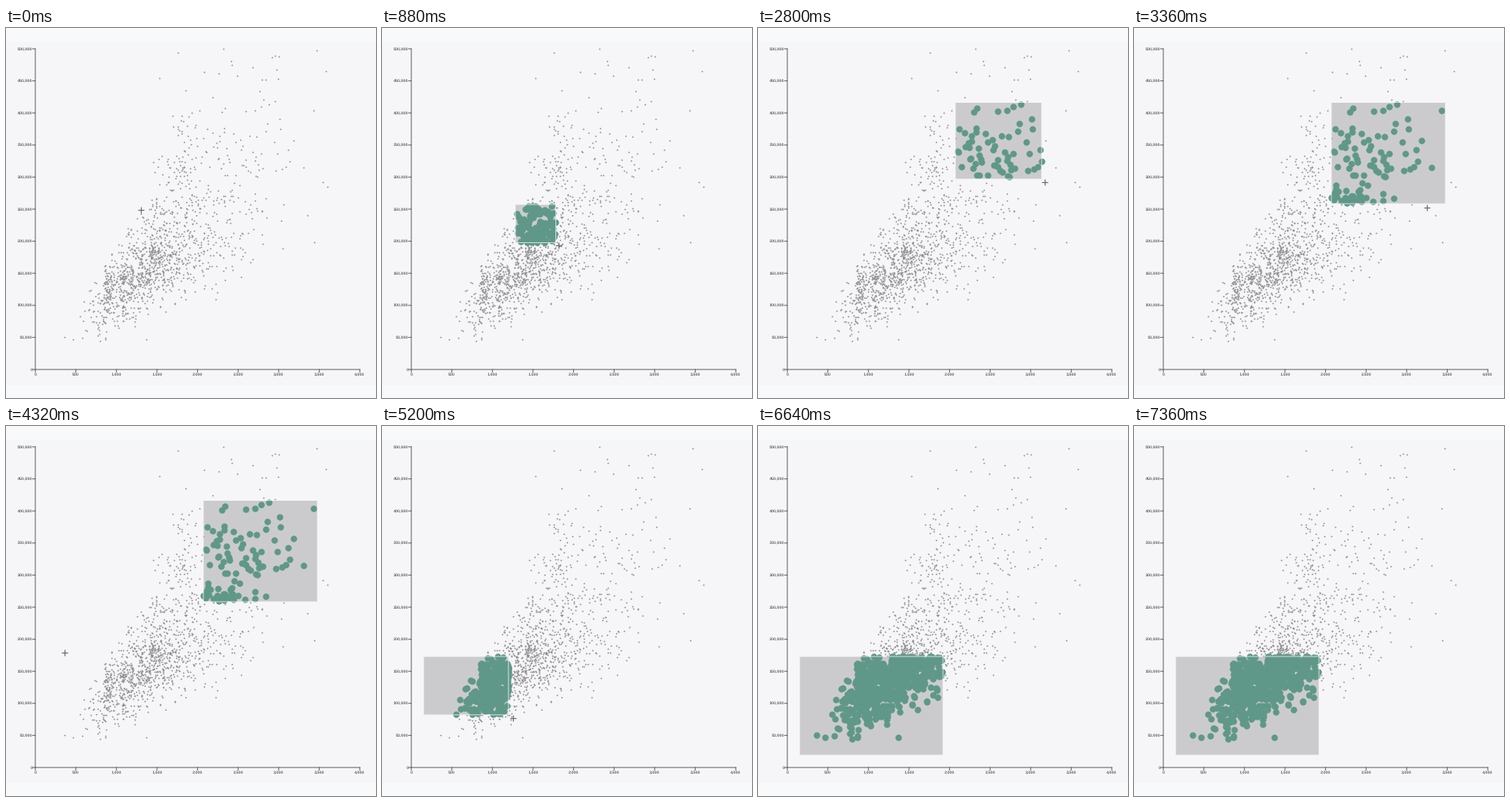
A matplotlib script for the animation above (7440 ms loop, 480 px wide and 480 px high).

```python
import numpy as np
import matplotlib.pyplot as plt
from matplotlib.animation import FuncAnimation
from matplotlib.patches import Rectangle

plt.rcParams["text.hinting"] = "none"

SIZE, DPI = 480, 100
STEP, FRAMES = 80, 93
PX = 72 / DPI  # one pixel in points
INK, DOT, GREEN = "#69696b", "#8e8e90", "#5f9888"

X0, X1, Y0, Y1 = 38, 459, 443, 27
AREA_MAX, PRICE_MAX = 4000, 500000

# Groups of houses on top of the main cloud: centre, spread, count
GROUPS = [
    ((192, 292), (4, 5), 45),
    ((152, 322), (4, 6), 30),
    ((132, 338), (3, 10), 50),
    ((222, 185), (12, 13), 42),
    ((236, 125), (14, 9), 20),
    ((262, 300), (28, 30), 50),
    ((290, 165), (24, 18), 22),
    ((312, 88), (50, 34), 28),
    ((372, 230), (24, 40), 8),
    ((110, 402), (35, 9), 8),
]

# Drags: start time, end time, first corner, last corner
DRAGS = [
    (320, 1440, (173, 229), (278, 328)),
    (2040, 3160, (256, 96.5), (404, 228)),
    (4560, 5700, (54, 299), (240, 427)),
]
POINTER_HOME = (175, 236)
POINTER_LEAD, POINTER_OFF = 25, 6000


def sx(area):
    return X0 + (X1 - X0) * area / AREA_MAX


def sy(price):
    return Y0 + (Y1 - Y0) * price / PRICE_MAX


def glide(a, b, u):
    u = np.clip(u, 0, 1)
    a, b = np.array(a), np.array(b)
    return a + (b - a) * u * u * (3 - 2 * u)


def make_points():
    rng = np.random.default_rng(12)
    z, noise = rng.normal(size=(2, 1130))
    area = np.exp(7.268 + 0.32 * z)
    price = np.exp(12.02 + 0.28 * z + 0.26 * noise)
    rate = price / area
    cloud = np.column_stack([sx(area), sy(price)])[(rate > 45) & (rate < 195)]
    groups = [rng.normal(c, s, (n, 2)) for c, s, n in GROUPS]
    pts = np.vstack([cloud, *groups])
    return pts[((pts > (70, 24)) & (pts < (418, 416))).all(axis=1)]


def brush_at(t):
    """Corners of the current selection, or None before the first drag."""
    box = None
    for t0, t1, a, b in DRAGS:
        if t > t0:
            box = np.array(a), glide(a, b, (t - t0) / (t1 - t0))
    return box


def pointer_at(t):
    """Follow each drag, and travel from its end to the next start."""
    last, pos = 0, POINTER_HOME
    for t0, t1, a, b in DRAGS:
        if t < t0:
            return glide(pos, a, (t - last) / (t0 - last))
        if t < t1:
            return glide(a, b, (t - t0) / (t1 - t0))
        last, pos = t1, b
    return pos


def draw_axes():
    def line(xs, ys):
        ax.plot(xs, ys, color=INK, lw=1.1 * PX, snap=False, zorder=3)

    font = dict(family="Liberation Sans", size=5.4 * PX, weight="bold",
                color=INK, va="center_baseline", zorder=3)
    line([X0, X0], [Y1, Y0])
    line([X0, X1], [Y0, Y0])
    for price in range(0, PRICE_MAX + 1, 50000):
        y = sy(price)
        line([X0 - 3.5, X0], [y, y])
        ax.text(34.3, y, f"{price:,}", ha="right", **font)
    for area in range(0, AREA_MAX + 1, 500):
        x = sx(area)
        line([x, x], [Y0, Y0 + 3.5])
        ax.text(x, 449.5, f"{area:,}", ha="center", **font)


def dots(width, color, z):
    return ax.scatter([], [], s=(width * PX) ** 2, c=color, lw=0,
                      snap=False, zorder=z)


fig = plt.figure(figsize=(SIZE / DPI, SIZE / DPI), dpi=DPI, facecolor="#f8f9fb")
ax = fig.add_axes([0, 0, 1, 1])
ax.set_xlim(0, SIZE)
ax.set_ylim(SIZE, 0)
ax.axis("off")
ax.add_patch(Rectangle((-1, 17.5), SIZE + 2, 445, fc="#f6f6f8", lw=0, zorder=0))
draw_axes()

points = make_points()
fill = ax.add_patch(Rectangle((0, 0), 0, 0, fc="#cbcbcd", lw=0, zorder=1))
small = dots(1.9, DOT, 4)
large = dots(8.4, GREEN, 5)
edge = ax.add_patch(Rectangle((0, 0), 0, 0, fc="none", ec="#f4f6f6", lw=PX,
                              alpha=0.8, snap=False, zorder=6))
pointer, = ax.plot([], [], "+", color="#69696b", ms=7.5 * PX, mew=1.2 * PX,
                   zorder=7)


def update(i):
    t = i * STEP
    box = brush_at(t)
    chosen = np.zeros(len(points), bool)
    for patch in (fill, edge):
        patch.set_visible(box is not None)
    if box is not None:
        a, b = box
        chosen = ((points >= a) & (points <= b)).all(axis=1)
        for patch in (fill, edge):
            patch.set_bounds(*a, *(b - a))
    small.set_offsets(points[~chosen])
    large.set_offsets(points[chosen])
    x, y = pointer_at(t + POINTER_LEAD if t else 0)
    pointer.set_data([x], [y])
    pointer.set_visible(t < POINTER_OFF)
    return fill, small, large, edge, pointer


anim = FuncAnimation(fig, update, frames=FRAMES, interval=STEP,
                     repeat=True, repeat_delay=0, blit=False)
plt.show()
```
